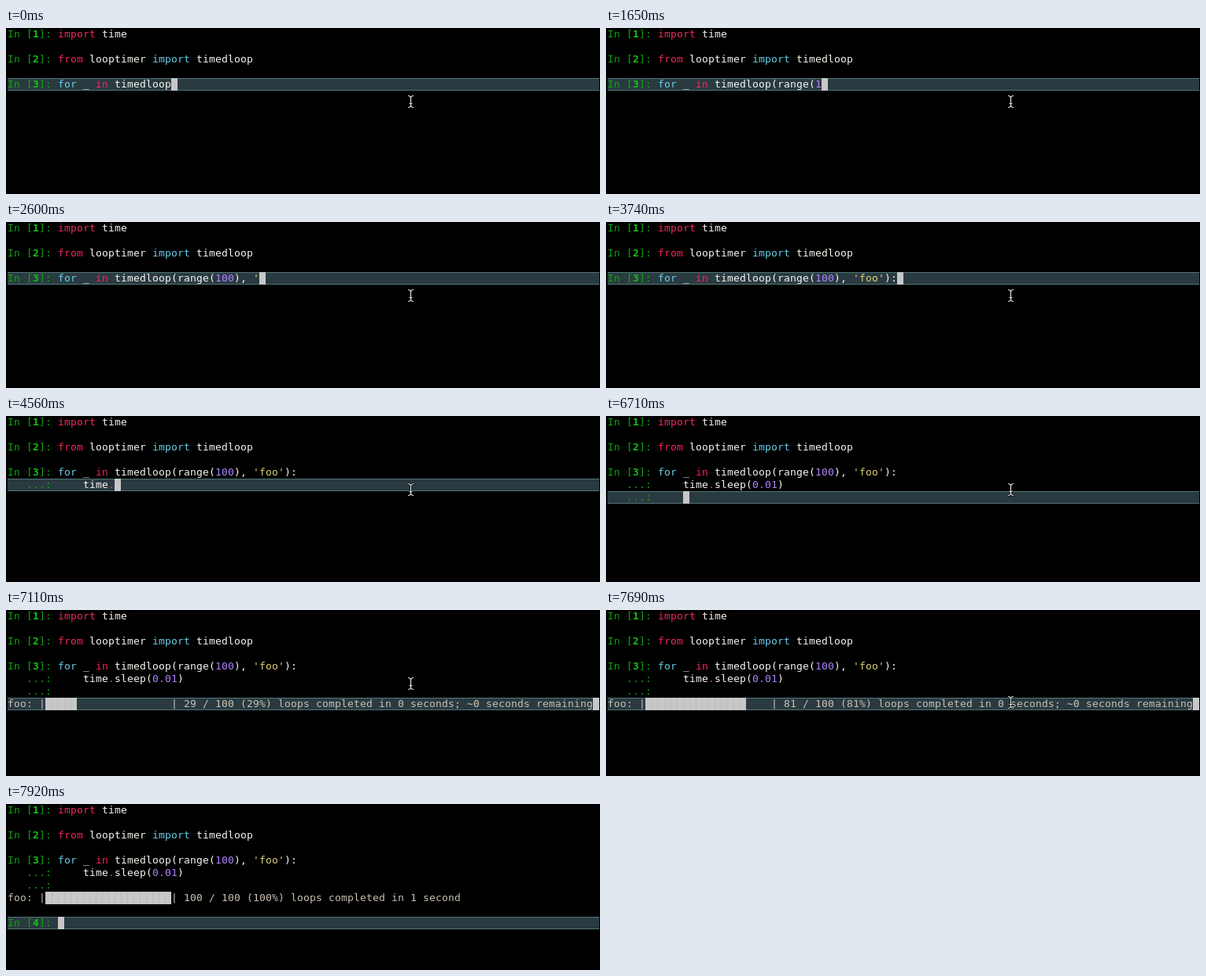
Animation of 755x212 px, one loop 8580 ms. Source, as an HTML page with a canvas:

```html
<!DOCTYPE html>
<html lang="en">
<head>
<meta charset="utf-8">
<title>Timed loop in a terminal</title>
<style>
  html, body { margin: 0; width: 100%; height: 100%; overflow: hidden; background: #000; }
  canvas { display: block; }
</style>
</head>
<body>
<canvas id="stage" width="755" height="212"></canvas>
<script>
const LOOP = 8580, CELL = 8, LINE = 16, LEFT = 2, BASELINE = 12;
const FONT = '13px "DejaVu Sans Mono", monospace';
const C = {
  text: '#f8f8f2', red: '#f5285a', cyan: '#66d3ef', purple: '#ae81ff', string: '#e0d478',
  green: '#0fa50f', number: '#12c412', plain: '#cbc0b2', block: '#c7c7c7',
  guide: '#2a3a41', guideEdge: '#527575'
};
const ctx = document.getElementById('stage').getContext('2d');

const columnX = col => LEFT + col * CELL;

function fillCells(row, col, count, color) {
  ctx.fillStyle = color;
  ctx.fillRect(columnX(col), row * LINE, count * CELL, LINE);
}

function write(row, col, text, color, bold) {
  ctx.font = (bold ? 'bold ' : '') + FONT;
  ctx.fillStyle = color;
  for (const ch of text) {
    if (ch !== ' ') ctx.fillText(ch, columnX(col), row * LINE + BASELINE);
    col++;
  }
  return col;
}

// Writes coloured runs, stopping after limit characters.
function writeRuns(row, col, runs, limit = Infinity) {
  for (const [text, color] of runs) {
    const part = text.slice(0, Math.max(0, limit));
    col = write(row, col, part, C[color]);
    limit -= text.length;
  }
  return col;
}

function prompt(row, n) {
  write(row, 0, 'In [', C.green);
  write(row, 4, n, C.number, true);
  write(row, 5, ']:', C.green);
}

function guide(row) {
  fillCells(row, 0, 94, C.guide);
  ctx.fillStyle = C.guideEdge;
  ctx.fillRect(LEFT, row * LINE, 94 * CELL, 1);
  ctx.fillRect(LEFT, row * LINE + LINE - 1, 94 * CELL, 1);
}

const forLine = [['for', 'cyan'], [' _ ', 'text'], ['in', 'red'], [' timedloop(range(', 'text'],
  ['100', 'purple'], ['), ', 'text'], ["'foo'", 'string'], ['):', 'text']];
const sleepLine = [['time', 'text'], ['.', 'red'], ['sleep(', 'text'], ['0.01', 'purple'], [')', 'text']];

// One time per typed character.
const forKeys = [350, 770, 860, 950, 1120, 1180, 1410, 1650, 1770, 1890, 2190, 2550, 2600, 2600,
  2900, 3020, 3140, 3260, 3500, 3740];
const sleepKeys = [4270, 4330, 4390, 4390, 4560, 4800, 4920, 5330, 5420, 5510, 5810,
  6110, 6230, 6230, 6350, 6530];
const ENTER_FOR = 3970, ENTER_SLEEP = 6710, RUN = 6830, MOUSE_MOVE = 7570, DONE = 7920;

const typed = (keys, t) => keys.filter(k => k <= t).length;

const brackets = [
  { from: 2190, to: 2550, row: 4, open: 32, close: 36 },
  { from: 3500, to: 3740, row: 4, open: 26, close: 44 },
  { from: 6530, to: 6710, row: 5, open: 22, close: 27 }
];

function matchBrackets(t) {
  for (const b of brackets) {
    if (t < b.from || t >= b.to) continue;
    fillCells(b.row, b.open, 1, '#aacccc');
    write(b.row, b.open, '(', '#000');
    fillCells(b.row, b.close, 1, '#880000');
    write(b.row, b.close, ')', '#ff8888');
  }
}

// The screen is redrawn in bursts while the loop runs.
function refreshTime(t) {
  const [start, step] = t < 7110 ? [RUN, 56] : t < MOUSE_MOVE ? [7110, 57.1] : [MOUSE_MOVE, 58.3];
  return start + Math.floor((t - start) / step + 0.01) * step;
}

const seconds = n => n + (n === 1 ? ' second' : ' seconds');

function progress(row, t) {
  const done = t >= DONE;
  const n = done ? 100 : Math.min(99, Math.round(29 + (refreshTime(t) - 7110) / 11));
  const spent = Math.floor(n * 0.011), left = Math.floor((100 - n) * 0.011);
  const filled = Math.floor(n / 5);
  write(row, 0, 'foo: |', C.plain);
  fillCells(row, 6, filled, C.block);
  ctx.fillStyle = '#bcbcbc';
  for (let i = 1; i < filled; i++) ctx.fillRect(columnX(6 + i), row * LINE, 1, LINE);
  const tail = done ? '' : `; ~${seconds(left)} remaining`;
  return write(row, 26, `| ${n} / 100 (${n}%) loops completed in ${seconds(spent)}${tail}`, C.plain);
}

function mouse(t) {
  if (t >= DONE) return;
  let y = 94;
  if (t >= MOUSE_MOVE) y += 95 * ((refreshTime(t) - MOUSE_MOVE + 58) / 350) ** 2;
  ctx.save();
  ctx.translate(514.5, Math.round(y));
  const beam = new Path2D('M-3.5-7.5Q-.5-7.5 0-5Q.5-7.5 3.5-7.5M0-5V5M-3.5 7.5Q-.5 7.5 0 5Q.5 7.5 3.5 7.5M-2 2.5H2');
  ctx.strokeStyle = '#000';
  ctx.lineWidth = 2.6;
  ctx.stroke(beam);
  ctx.strokeStyle = '#e4e4e4';
  ctx.lineWidth = 1.2;
  ctx.stroke(beam);
  ctx.restore();
}

function draw(t) {
  ctx.fillStyle = '#000';
  ctx.fillRect(0, 0, 755, 212);

  const row = t < ENTER_FOR ? 4 : t < ENTER_SLEEP ? 5 : t < RUN ? 6 : t < DONE ? 7 : 9;
  guide(row);

  prompt(0, '1');
  writeRuns(0, 8, [['import', 'red'], [' time', 'text']]);
  prompt(2, '2');
  writeRuns(2, 8, [['from', 'red'], [' looptimer ', 'text'], ['import', 'cyan'], [' timedloop', 'text']]);
  prompt(4, '3');

  let cursor = writeRuns(4, 8, forLine, 18 + typed(forKeys, t));
  if (row >= 5) {
    write(5, 3, '...:', C.green);
    cursor = writeRuns(5, 12, sleepLine, typed(sleepKeys, t));
  }
  if (row >= 6) {
    write(6, 3, '...:', C.green);
    cursor = 12;
  }
  if (row >= 7) cursor = progress(7, t);
  if (row === 9) {
    prompt(9, '4');
    cursor = 8;
  }

  matchBrackets(t);
  fillCells(row, cursor, 1, C.block);
  mouse(t);
}

const began = performance.now();
function tick() {
  draw((performance.now() - began) % LOOP);
  requestAnimationFrame(tick);
}
tick();
</script>
</body>
</html>
```
